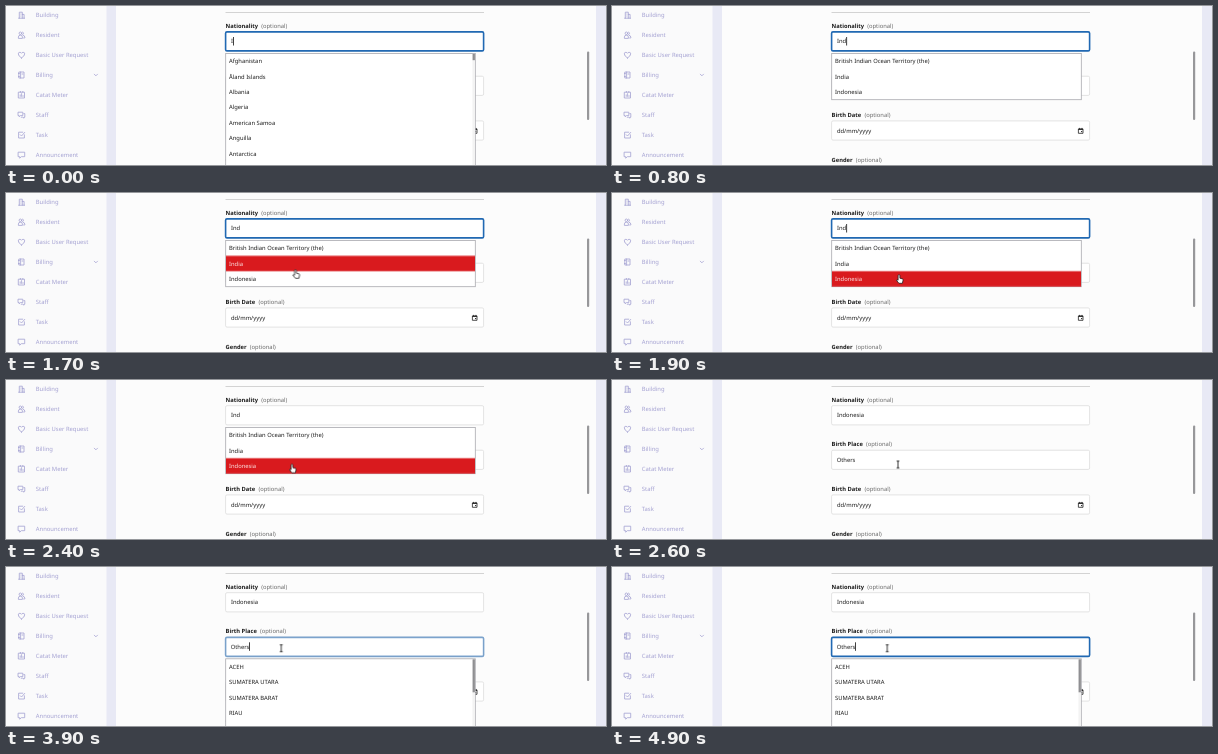
An HTML page for the animation above (5 s loop, 600 px wide and 159 px high).

```html
<!DOCTYPE html>
<html lang="en">
<head>
<meta charset="utf-8">
<title>Form with suggestions</title>
<style>
  html, body { margin: 0; width: 100%; height: 100%; overflow: hidden; background: #fcfcfc; }
  svg { display: block; width: 600px; height: 159px; }
  text { font: 5.82px "Noto Sans", "Open Sans", sans-serif; fill: #1c1c1c; text-rendering: geometricPrecision; white-space: pre; }
  .label { font-size: 5.75px; font-weight: 700; }
  .label tspan { font-size: 5.82px; font-weight: 400; fill: #6a6a6a; }
  .nav text { font-size: 5.87px; font-weight: 500; fill: #a4a1d2; }
  .icon { fill: none; stroke: #a4a1d2; stroke-width: .8; stroke-linejoin: round; stroke-linecap: round; }
  .box { fill: #fff; stroke: #dcdcdc; stroke-width: .8; }
  .ring { fill: none; stroke: #2169b3; stroke-width: 1.6; }
  .menu { fill: #fff; stroke: #a9a9ae; stroke-width: .8; }
  .track { fill: #f3f3f3; }
  .thumb { fill: #8f8f92; }
  .caret { fill: #111; }
  .mark { fill: #d91a1e; }

  .anim { animation: 5s step-end infinite; }

  .typed-n { animation-name: typed-n; }
  .typed-d { animation-name: typed-d; }
  .typed-rest { animation-name: typed-rest; }
  @keyframes typed-n { 0% { visibility: hidden } 2%, 100% { visibility: visible } }
  @keyframes typed-d { 0% { visibility: hidden } 16%, 100% { visibility: visible } }
  @keyframes typed-rest { 0% { visibility: hidden } 52%, 100% { visibility: visible } }

  .ring-a { animation-name: ring-a; }
  .ring-b { animation-name: ring-b; }
  @keyframes ring-a { 0% { opacity: 1 } 46% { opacity: .45 } 48%, 100% { opacity: 0 } }
  @keyframes ring-b { 0% { opacity: 0 } 78% { opacity: .55 } 80%, 100% { opacity: 1 } }

  .caret-a { animation-name: caret-a; }
  .caret-b { animation-name: caret-b; }
  @keyframes caret-a {
    0% { transform: translateX(227px); opacity: 1 }
    2% { transform: translateX(230.6px); opacity: 1 }
    16% { transform: translateX(234.1px); opacity: 1 }
    26% { transform: translateX(234.1px); opacity: 0 }
    36% { transform: translateX(234.1px); opacity: 1 }
    46%, 100% { transform: translateX(234.1px); opacity: 0 }
  }
  @keyframes caret-b { 0% { opacity: 0 } 78% { opacity: 1 } 88% { opacity: 0 } 98%, 100% { opacity: 1 } }

  .list-i { animation-name: list-i; }
  .list-in { animation-name: list-in; }
  .list-ind { animation-name: list-ind; }
  .list-place { animation-name: list-place; }
  @keyframes list-i { 0% { opacity: 1 } 2%, 100% { opacity: 0 } }
  @keyframes list-in { 0% { opacity: 0 } 2% { opacity: 1 } 16%, 100% { opacity: 0 } }
  @keyframes list-ind { 0% { opacity: 0 } 16% { opacity: 1 } 52%, 100% { opacity: 0 } }
  @keyframes list-place { 0% { opacity: 0 } 78%, 100% { opacity: 1 } }

  .mark { animation-name: mark; }
  .row-1 { animation-name: row-1; }
  .row-2 { animation-name: row-2; }
  .row-3 { animation-name: row-3; }
  @keyframes mark {
    0% { transform: translateY(0); opacity: 0 }
    22% { transform: translateY(0); opacity: 1 }
    32% { transform: translateY(15.4px); opacity: 1 }
    36%, 100% { transform: translateY(30.8px); opacity: 1 }
  }
  @keyframes row-1 { 0% { fill: #1c1c1c } 22% { fill: #fbe6e6 } 32%, 100% { fill: #1c1c1c } }
  @keyframes row-2 { 0% { fill: #1c1c1c } 32% { fill: #fbe6e6 } 36%, 100% { fill: #1c1c1c } }
  @keyframes row-3 { 0% { fill: #1c1c1c } 36%, 100% { fill: #fbe6e6 } }

  .pointer { animation-name: pointer; }
  .hand { animation-name: hand; }
  .beam { animation-name: beam; }
  @keyframes pointer {
    0% { transform: translate(304px, 39px) }
    22% { transform: translate(302px, 49px) }
    24% { transform: translate(301px, 55px) }
    26% { transform: translate(300px, 59px) }
    28% { transform: translate(299.5px, 61.3px) }
    30% { transform: translate(298px, 62px) }
    32% { transform: translate(294px, 71px) }
    34% { transform: translate(289.5px, 77px) }
    36% { transform: translate(288px, 79.5px) }
    38% { transform: translate(287px, 82px) }
    40% { transform: translate(286.5px, 83.5px) }
    42% { transform: translate(286px, 84.5px) }
    60% { transform: translate(284px, 84px) }
    62% { transform: translate(281px, 83px) }
    64% { transform: translate(278px, 82.5px) }
    66% { transform: translate(276px, 82px) }
    74%, 100% { transform: translate(275.2px, 81.2px) }
  }
  @keyframes hand { 0% { opacity: 0 } 22% { opacity: 1 } 52%, 100% { opacity: 0 } }
  @keyframes beam { 0% { opacity: 0 } 20% { opacity: 1 } 22% { opacity: 0 } 52%, 100% { opacity: 1 } }
</style>
</head>
<body>
<svg viewBox="0 0 600 159">
  <rect width="600" height="159" fill="#e8e9f5"/>
  <rect width="100.5" height="159" fill="#fafafb"/>
  <rect x="110" width="480" height="159" fill="#fcfcfc"/>
  <rect x="581" y="45.5" width="2.2" height="68.5" rx="1" fill="#97979a"/>

  <g class="nav">
    <text x="29.8" y="11.2">Building</text>
    <text x="29.8" y="31.1">Resident</text>
    <text x="29.8" y="51.1">Basic User Request</text>
    <text x="29.8" y="71">Billing</text>
    <text x="29.8" y="91">Catat Meter</text>
    <text x="29.8" y="110.9">Staff</text>
    <text x="29.8" y="130.9">Task</text>
    <text x="29.8" y="150.8">Announcement</text>
  </g>

  <g class="icon">
    <path d="M12.6 12.2h6M13.3 12.2V6.2h3v6M16.3 8.4h1.8v3.8M14.8 8v.1M14.8 10v.1"/>
    <path d="M12.4 32v-1q0-1.8 2-1.8t2 1.8v1zM17.6 32h1.2v-.8q0-1.6-1.6-1.9M16.6 26.1a1.3 1.3 0 0 1 0 2.5"/>
    <circle cx="14.4" cy="27.3" r="1.3"/>
    <path d="M15.5 52q-3.2-2-3.2-4.1 0-1.6 1.6-1.6 1.1 0 1.6 1 .5-1 1.6-1 1.6 0 1.6 1.6 0 2.1-3.2 4.1z"/>
    <path d="M13.2 66h4.8v6h-4.8zM14.6 66v6M12.4 67.5h1M12.4 70.5h1M16 68h1"/>
    <path d="M12.7 86.2h5.8v5.8h-5.8zM14.2 90.4v-1.5M15.6 90.4v-2.8M17 90.4v-.8M14.4 85.4v.8M16.8 85.4v.8"/>
    <path d="M12.4 106.2h4.4v3.4h-2.4l-1.2 1.2v-1.2h-.8zM17.8 107.6h1v3.6H18v1l-1.2-1h-1.6"/>
    <path d="M18.4 128.8v3.2h-5.8v-5.8h4.2M14.2 128.7l1.3 1.3 3.2-3.6"/>
    <path d="M12.5 146.2h6.2v4.5h-3.4l-1.6 1.5v-1.5h-1.2z"/>
    <path d="M88.3 68.2l1.6 1.6 1.6-1.6"/>
  </g>

  <path d="M219.5 6.5h258.5" stroke="#cfcfcf" stroke-width=".9"/>

  <text class="label" x="219.6" y="21.8">Nationality<tspan dx="3.2">(optional)</tspan></text>
  <text class="label" x="219.6" y="66.3">Birth Place<tspan dx="3.2">(optional)</tspan></text>
  <text class="label" x="219.6" y="111">Birth Date<tspan dx="3.2">(optional)</tspan></text>
  <text class="label" x="219.6" y="156">Gender<tspan dx="3.2">(optional)</tspan></text>

  <rect class="box" x="219.6" y="25.7" width="258" height="19.2" rx="1.4"/>
  <rect class="box" x="219.6" y="70.2" width="258" height="19.2" rx="1.4"/>
  <rect class="box" x="219.6" y="114.9" width="258" height="19.2" rx="1.4"/>
  <rect class="ring ring-a anim" x="219.6" y="25.9" width="258" height="19" rx="1.4"/>
  <rect class="ring ring-b anim" x="219.6" y="70.4" width="258" height="19" rx="1.4"/>

  <text x="224.9" y="37.4">I<tspan class="typed-n anim">n</tspan><tspan class="typed-d anim">d</tspan><tspan class="typed-rest anim">onesia</tspan></text>
  <text x="224.7" y="82">Others</text>
  <text x="224.9" y="127">dd/mm/yyyy</text>
  <path d="M466.4 122.9h4.6v4.4h-4.6zM467.5 121.9v1M469.9 121.9v1" fill="none" stroke="#222" stroke-width=".8"/>
  <path d="M466.4 123.4h4.6M469 125.6h1.2" stroke="#222" stroke-width="1"/>
  <rect class="caret caret-a anim" y="31" width=".8" height="8.5"/>
  <rect class="caret caret-b anim" x="243.2" y="75.3" width=".8" height="8.5"/>

  <g class="list-i anim">
    <rect class="menu" x="219.7" y="47.5" width="249.6" height="140"/>
    <rect class="track" x="466.4" y="48" width="2.6" height="139"/>
    <rect class="thumb" x="466.6" y="48" width="2.3" height="6.2"/>
    <text x="223" y="57.2">Afghanistan</text>
    <text x="223" y="72.6">Åland Islands</text>
    <text x="223" y="88">Albania</text>
    <text x="223" y="103.4">Algeria</text>
    <text x="223" y="118.8">American Samoa</text>
    <text x="223" y="134.2">Anguilla</text>
    <text x="223" y="149.6">Antarctica</text>
  </g>

  <g class="list-in anim">
    <rect class="menu" x="219.7" y="47.5" width="249.6" height="140"/>
    <rect class="track" x="466.4" y="48" width="2.6" height="139"/>
    <rect class="thumb" x="466.6" y="48" width="2.3" height="28"/>
    <text x="223" y="57.2">Argentina</text>
    <text x="223" y="72.6">Bahrain</text>
    <text x="223" y="88">Benin</text>
    <text x="223" y="103.4">Bolivia (Plurinational State of)</text>
    <text x="223" y="118.8">Bonaire, Sint Eustatius and Saba</text>
    <text x="223" y="134.2">Bosnia and Herzegovina</text>
    <text x="223" y="149.6">British Indian Ocean Territory (the)</text>
  </g>

  <g class="list-ind anim">
    <rect class="menu" x="219.7" y="47.5" width="249.6" height="46.2"/>
    <rect class="mark anim" x="220" y="47.4" width="249" height="15.4"/>
    <text class="row-1 anim" x="223" y="57.2">British Indian Ocean Territory (the)</text>
    <text class="row-2 anim" x="223" y="72.6">India</text>
    <text class="row-3 anim" x="223" y="88">Indonesia</text>
  </g>

  <g class="list-place anim">
    <rect class="menu" x="219.7" y="91.8" width="249.6" height="140"/>
    <rect class="track" x="466.4" y="92.3" width="2.6" height="139"/>
    <rect class="thumb" x="466.6" y="92.3" width="2.3" height="33"/>
    <text x="223" y="101.8">ACEH</text>
    <text x="223" y="117.2">SUMATERA UTARA</text>
    <text x="223" y="132.6">SUMATERA BARAT</text>
    <text x="223" y="148">RIAU</text>
  </g>

  <g class="pointer anim">
    <path class="hand anim" d="M-.9 .6a.9.9 0 0 1 1.8 0V3.2l2.6.7q.8.3.6 1.2L3.4 8.3H-.1L-2.6 5.2q.3-1.1 1.7 0z" fill="#fff" stroke="#222" stroke-width=".8" stroke-linejoin="round"/>
    <path class="beam anim" d="M-1.4-3.4H1.4M0-3.4V3.4M-1.4 3.4H1.4" fill="none" stroke="#222" stroke-width=".9"/>
  </g>
</svg>
</body>
</html>
```
